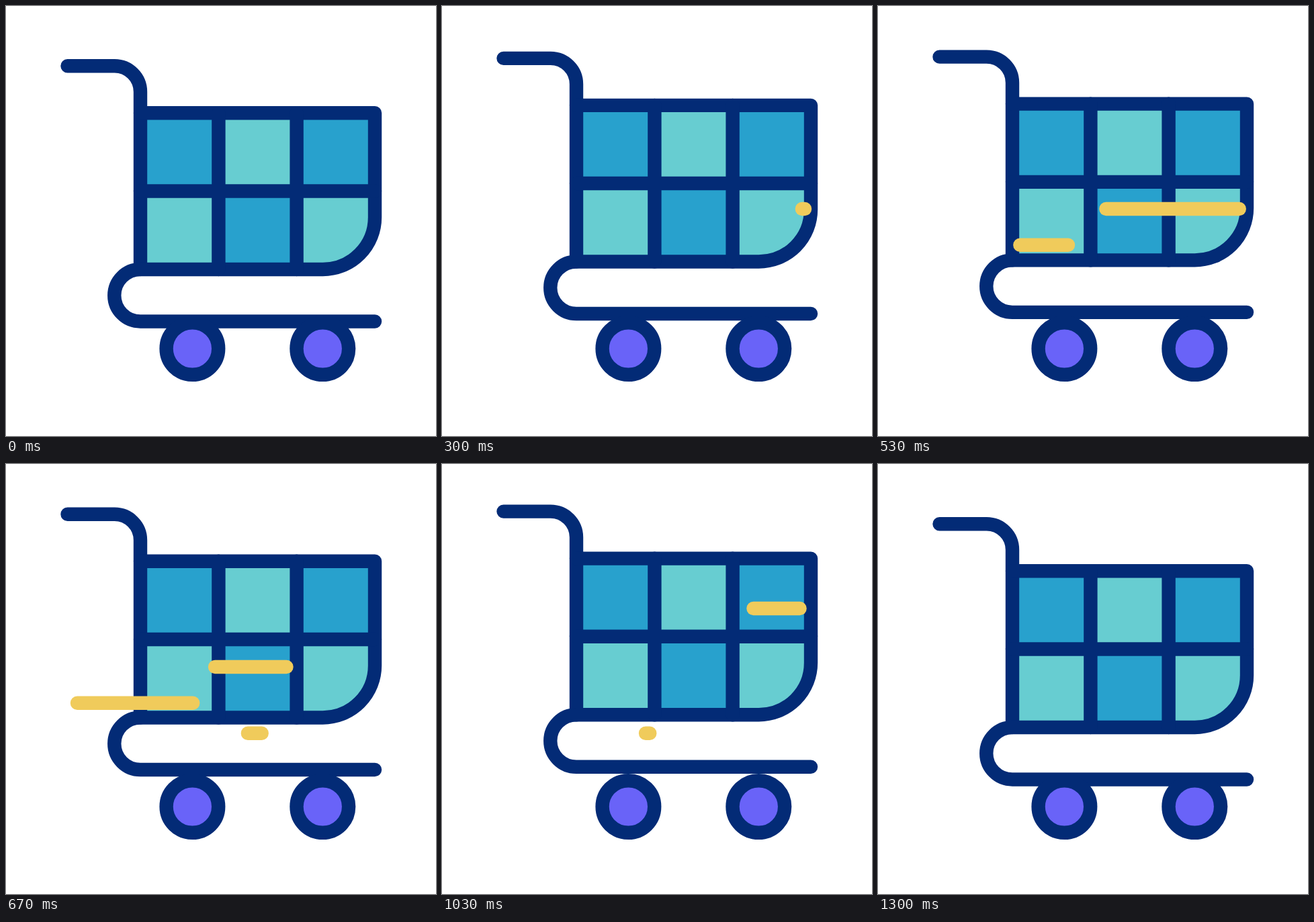
An HTML page for the animation above (2000 ms loop, 640 by 640 pixels).

```html
<!DOCTYPE html>
<html lang="en">
<head>
<meta charset="utf-8">
<title>Shopping cart</title>
<style>
  html, body { margin: 0; width: 100%; height: 100%; overflow: hidden; background: #fff; }
  svg { display: block; width: 100vw; height: 100vh; }
  .ink { fill: none; stroke: #032b76; stroke-width: 20.4; stroke-linecap: round; stroke-linejoin: round; }
  .blue { fill: #28a1cd; }
  .teal { fill: #67cdd1; }
  .wheel { fill: #6963f8; }
  #lines { stroke: #f0cb5b; stroke-width: 20.4; stroke-linecap: round; }
</style>
</head>
<body>
<svg viewBox="0 0 640 640">
  <g id="cart">
    <path class="blue" d="M200 159.3H549V314.5A77.5 77.5 0 0 1 471.5 392H200Z"/>
    <path class="teal" d="M316.4 159.3H432.6V275.5H316.4ZM200 275.5H316.4V392H200ZM432.6 275.5H549V314.5A77.5 77.5 0 0 1 471.5 392H432.6Z"/>
    <path class="ink" d="M91.5 89.3H161.5A38.5 38.5 0 0 1 200 127.8V392"/>
    <path class="ink" d="M200 159.3H549V314.5A77.5 77.5 0 0 1 471.5 392H200A38.75 38.75 0 0 0 200 469.5H549"/>
    <path class="ink" d="M200 275.5H549M316.4 159.3V392M432.6 159.3V392"/>
  </g>
  <g class="ink">
    <circle class="wheel" cx="277.4" cy="510" r="38.8"/>
    <circle class="wheel" cx="471.3" cy="510" r="38.8"/>
  </g>
  <g id="lines"></g>
</svg>
<script>
  const LOOP = 2000, TICK = 100 / 3, LAST = 39;
  const HEAD = 10, LAG = 7.3, TAIL = 8.6;

  // Cart height: [tick, y]
  const bob = [[0, 0], [5.3, -22.2], [12, -3.6], [18, -17.2], [24, -6.7], [30, -20.2], [36, 0], [LAST, 0]];

  // Speed lines run from right to left
  const streaks = [
    { y: 302, from: 540, to: 311, start: 8.2 },
    { y: 355.8, from: 283, to: 87.5, start: 11.9 },
    { y: 400.7, from: 380.7, to: 303, start: 16.6 },
    { y: 215, from: 537, to: 459, start: 22.45 }
  ];

  const cart = document.getElementById('cart');
  const lines = document.getElementById('lines');
  for (const s of streaks) {
    s.el = document.createElementNS('http://www.w3.org/2000/svg', 'line');
    s.el.setAttribute('y1', s.y);
    s.el.setAttribute('y2', s.y);
    lines.append(s.el);
  }

  const ease = u => {
    u = Math.min(1, Math.max(0, u));
    return u * u * (3 - 2 * u);
  };
  const mix = (a, b, u) => a + (b - a) * u;

  function cartY(k) {
    const i = Math.max(1, bob.findIndex(p => p[0] >= k));
    const [t0, y0] = bob[i - 1], [t1, y1] = bob[i];
    return mix(y0, y1, ease((k - t0) / (t1 - t0)));
  }

  function draw(ms) {
    // The motion advances in ticks, then rests until the loop ends
    const k = Math.min(LAST, Math.floor((ms + 4) / TICK));
    cart.setAttribute('transform', `translate(0 ${cartY(k)})`);
    for (const { el, from, to, start } of streaks) {
      const head = ease((k - start) / HEAD);
      const tail = ease((k - start - LAG) / TAIL);
      el.setAttribute('x1', mix(from, to, head));
      el.setAttribute('x2', mix(from, to, tail));
      el.setAttribute('visibility', head > 0 && tail < 1 ? 'visible' : 'hidden');
    }
  }

  const begin = performance.now();
  function loop() {
    draw((performance.now() - begin) % LOOP);
    requestAnimationFrame(loop);
  }
  loop();
</script>
</body>
</html>
```
